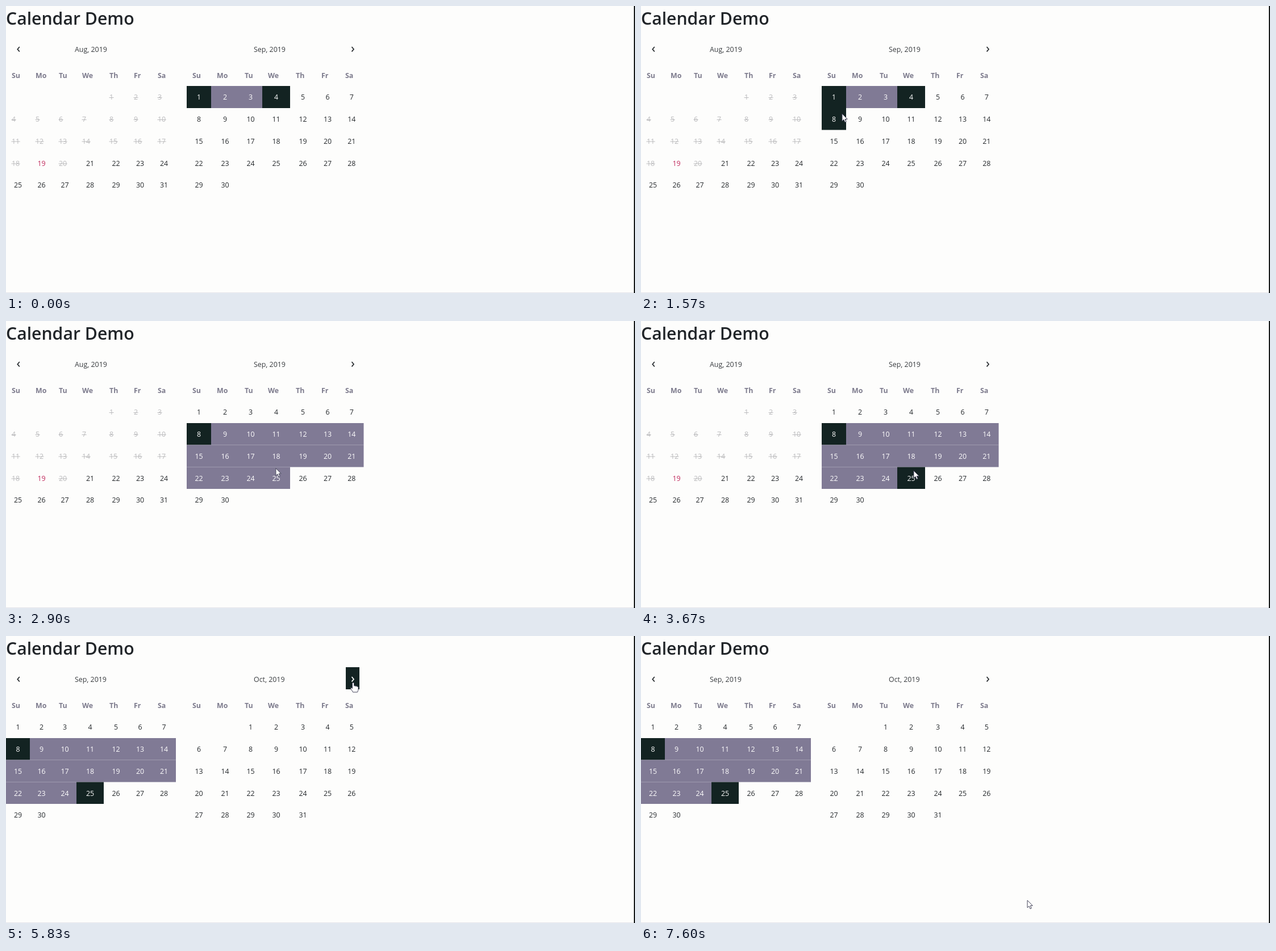
Write an HTML page with a canvas that moves like this. It is 1107 by 506 pixels and loops after 7.7 s.

```html
<!DOCTYPE html>
<html lang="en">
<head>
<meta charset="utf-8">
<title>Calendar Demo</title>
<style>
  html, body { margin: 0; width: 100%; height: 100%; overflow: hidden; background: #fdfdfc; }
  canvas { display: block; }
</style>
</head>
<body>
<canvas id="stage" width="1107" height="506"></canvas>
<script>
const ctx = document.getElementById('stage').getContext('2d');
const LOOP = 7700, FONT = '"Open Sans", "Noto Sans", sans-serif';
const INK = '#262a2d', DARK = '#132322', RANGE = '#807a95', MUTED = '#bcbcbe';
const DAYS = ['Su', 'Mo', 'Tu', 'We', 'Th', 'Fr', 'Sa'];
const MONTHS = [
  { name: 'Aug', first: 4, days: 31 },
  { name: 'Sep', first: 0, days: 30 },
  { name: 'Oct', first: 2, days: 31 }
];
const PANELS = [
  { titleX: 121, cols: [0, 42, 83, 124, 172, 215, 257, 299] },
  { titleX: 436, cols: [318, 361, 410, 451, 500, 545, 587, 629.5] }
];
const ROWS = [141, 180, 218.5, 257.5, 296, 335];
const BUTTON = { x: 598, y: 55, w: 24, h: 39 };
const CLEAR = 1800, CONFIRM = 3670, NEXT = 5830;

// Pointer path: time, x, y
const PATH = [
  [130, 640, 490], [300, 354, 190], [1980, 354, 190], [2300, 417, 220], [2370, 425, 224],
  [2730, 470, 252], [2800, 473, 258], [3170, 480, 264], [4570, 480, 264],
  [5170, 611, 82], [6940, 611, 82], [7600, 680, 466], [LOOP, 680, 466]
];

function pointerAt(t) {
  if (t < PATH[0][0]) return null;
  const i = PATH.findIndex(p => p[0] > t);
  const [t0, x0, y0] = PATH[i - 1], [t1, x1, y1] = PATH[i];
  const k = (t - t0) / (t1 - t0);
  return { x: x0 + (x1 - x0) * k, y: y0 + (y1 - y0) * k };
}

const inside = (p, x, y, w, h) => p && p.x >= x && p.x < x + w && p.y >= y && p.y < y + h;

function fill(color, x, y, w, h) {
  ctx.fillStyle = color;
  ctx.fillRect(x, y, w, h);
}

function text(str, x, y, color, size = 12.4, weight = 400, align = 'left') {
  ctx.font = `${weight} ${size}px ${FONT}`;
  ctx.textAlign = align;
  ctx.fillStyle = color;
  ctx.fillText(str, x, y);
}

function chevron(x, dir, color) {
  ctx.strokeStyle = color;
  ctx.lineWidth = 1.7;
  ctx.beginPath();
  ctx.moveTo(x - dir * 1.8, 72);
  ctx.lineTo(x + dir * 1.7, 76.2);
  ctx.lineTo(x - dir * 1.8, 80.4);
  ctx.stroke();
}

function cells(panel, month) {
  return Array.from({ length: month.days }, (_, i) => {
    const slot = i + month.first, col = slot % 7, row = Math.floor(slot / 7);
    const x = panel.cols[col], y = ROWS[row];
    return { day: i + 1, x, y, w: panel.cols[col + 1] - x, h: ROWS[row + 1] - y };
  });
}

function drawCell(c, month, pointer, t) {
  const august = month.name === 'Aug';
  const base = c.y + 24;
  if (august && (c.day < 19 || c.day === 20)) {
    text(c.day, c.x + 10, base, MUTED);
    fill(MUTED, c.x + 9.5, base - 4, ctx.measureText(c.day).width + 1, 1);
    return;
  }
  const hovered = inside(pointer, c.x, c.y, c.w, c.h);
  const choosing = t >= CLEAR && t < CONFIRM;
  let back = null;
  if (month.name === 'Sep') {
    const [from, to] = t < CLEAR ? [1, 4] : [8, choosing ? month.hover : 25];
    if (c.day === from || (c.day === to && !choosing)) back = DARK;
    else if (c.day > from && c.day <= to) back = RANGE;
  }
  if (hovered && !choosing) back = DARK;
  if (back) fill(back, c.x, c.y, c.w, c.h);
  const color = back ? '#fdfdfd' : august && c.day === 19 ? '#c02a5c' : INK;
  text(c.day, c.x + c.w / 2, base, color, 12.4, 400, 'center');
}

function drawPanel(panel, month, pointer, t) {
  text(`${month.name}, 2019`, panel.titleX, 81, '#3a3d40');
  DAYS.forEach((d, i) => text(d, panel.cols[i] + 10, 126.5, '#7c7a8c', 12.4, 700));
  const list = cells(panel, month);
  const over = list.find(c => inside(pointer, c.x, c.y, c.w, c.h));
  month.hover = over ? over.day : 8;
  list.forEach(c => drawCell(c, month, pointer, t));
}

const ARROW = new Path2D('M0 0V13L3 10.2L5 15L7.2 14L5.2 9.4H9.2Z');
const HAND = new Path2D('M-1.5 1Q0 -1 1.5 1V6Q3 5 4 6.5Q5.5 5.5 6.5 7Q8.5 6.5 9 8.5V12Q9 14 7.5 17H-.5' +
  'Q-1.5 14.5 -4 11.5Q-5 9 -3 9L-1.5 10.5Z');

function drawPointer(p, hand) {
  ctx.save();
  ctx.translate(p.x, p.y);
  ctx.lineJoin = 'round';
  ctx.lineWidth = 1;
  ctx.strokeStyle = '#45455a';
  ctx.fillStyle = '#fff';
  const shape = hand ? HAND : ARROW;
  ctx.fill(shape);
  ctx.stroke(shape);
  ctx.restore();
}

function draw(t) {
  const pointer = pointerAt(t);
  const onNext = inside(pointer, BUTTON.x, BUTTON.y, BUTTON.w, BUTTON.h);
  const shown = t < NEXT ? 0 : 1;
  fill('#fdfdfc', 0, 0, 1107, 506);
  fill('#e4e4ea', 0, 505, 1105, 1);
  fill('#151818', 1105, 0, 2, 506);
  text('Calendar Demo', 0, 32.5, '#212529', 30.2, 600);
  if (onNext) fill(DARK, BUTTON.x, BUTTON.y, BUTTON.w, BUTTON.h);
  chevron(22, -1, INK);
  chevron(610.3, 1, onNext ? '#fff' : INK);
  PANELS.forEach((panel, i) => drawPanel(panel, MONTHS[shown + i], pointer, t));
  if (pointer) drawPointer(pointer, onNext);
}

const start = performance.now();
function tick() {
  draw((performance.now() - start) % LOOP);
  requestAnimationFrame(tick);
}
tick();
</script>
</body>
</html>
```
